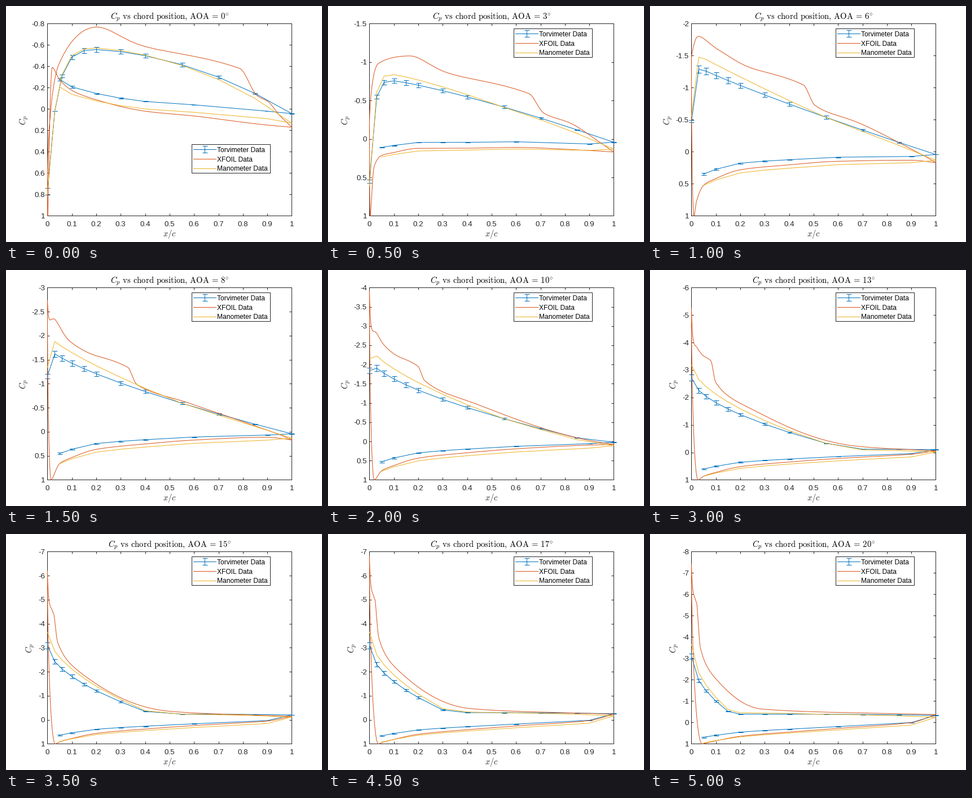
A matplotlib script that plays this animation: 560x420 px, repeating every 5.5 s.

```python
import numpy as np
import matplotlib.pyplot as plt
from matplotlib.animation import FuncAnimation
from matplotlib.patches import Rectangle
from matplotlib.transforms import Affine2D

W, H, DPI = 560, 420, 100
PX = 72 / DPI  # points per pixel
BLUE, ORANGE, YELLOW, INK = "#0072BD", "#D95319", "#EDB120", "#262626"
REL_ERR = 0.041

plt.rcParams.update({
    "font.family": "Liberation Sans",
    "mathtext.fontset": "cm",
    "axes.unicode_minus": False,
})

ANGLES = [0, 3, 6, 8, 10, 11, 13, 15, 16, 17, 20]
LOWEST = [-.8, -1.5, -2, -3, -4, -5, -6, -7, -7, -7, -8]

# Pressure taps along the chord
TAPS_UP = np.array([0, .03, .06, .1, .15, .2, .3, .4, .55, .7, .85, 1])
TAPS_LO = np.array([.05, .1, .2, .3, .4, .6, .9])
TAPS = np.concatenate([TAPS_UP, TAPS_LO[::-1]])
ROOT = np.linspace(0, 1, 700)  # square root of chord position

# Upper-side key values over the angle of attack
KEY_AOA = [0, 3, 8, 11, 15, 17, 20]
TRANSITION = [.82, .68, .342, .139, .027, .0235, .022]
KNEE = [-.42, -.98, -2.35, -3.1, -4.6, -5.17, -5.78]
CREST = [-.768, -1.08, -1.9, -2.82, -4.57, -5.13, -5.74]
BEFORE = [-.38, -.59, -1.345, -2.26, -4.4, -5, -5.6]
AFTER = [-.125, -.335, -.985, -1.87, -3.23, -3.42, -3.5]


def smooth(points, root):
    """Shape-preserving cubic over the square root of x."""
    xs, ys = np.array(points).T
    xs = np.sqrt(xs)
    h = np.diff(xs)
    d = np.diff(ys) / h
    same = d[:-1] * d[1:] > 0
    inner = np.where(same, 2 * d[:-1] * d[1:] / np.where(same, d[:-1] + d[1:], 1), 0)
    m = np.concatenate([d[:1], inner, d[-1:]])
    i = np.clip(np.searchsorted(xs, root, side="right") - 1, 0, len(h) - 1)
    t = (root - xs[i]) / h[i]
    return (ys[i] * (1 + 2 * t) * (1 - t) ** 2 + ys[i + 1] * t * t * (3 - 2 * t)
            + h[i] * (m[i] * t * (1 - t) ** 2 - m[i + 1] * t * t * (1 - t)))


def ease(t):
    t = np.clip(t, 0, 1)
    return t * t * (3 - 2 * t)


def foil_points(aoa):
    """Key points of the upper and lower side, and the nose suction spike."""
    trans, knee, crest, before, after = (
        np.interp(aoa, KEY_AOA, row)
        for row in (TRANSITION, KNEE, CREST, BEFORE, AFTER))
    sep = np.interp(aoa, [8, 11, 15, 20], [.95, .85, .5, .29])
    te = .17 - .045 * max(aoa - 8, 0)
    sep_cp = te - .1 - .22 * (1 - sep)
    nose = knee + max(1.1 - .09 * aoa, -.3)
    spike = -1.35 * ease((aoa - 4.5) / 6.5)

    x_knee = .012 + .035 * np.exp(-aoa / 8)
    x_before, x_after = .96 * trans, 1.03 * trans + .014
    x_crest = x_knee + .21 * (x_before - x_knee)
    upper = [(0, nose), (x_knee, knee), (x_crest, crest),
             (x_crest + .3 * (x_before - x_crest), crest + .43 * (before - crest)),
             (x_before, before), (x_after, after),
             (np.sqrt(x_after * sep), after + (.3 + .011 * aoa) * (sep_cp - after)),
             (sep, sep_cp), (1, te)]

    # The lower side saturates with angle, fastest near the nose
    x_stag = max(.0024 * aoa - .004, .001)
    x = np.array([.02, .05, .1, .2, .4, .6])
    limit = np.array([1.4, 1.05, .95, .79, .64, .43])
    drop = np.array([1.79, 1.325, 1.125, .877, .62, .365])
    cp = limit - drop * np.exp(-aoa / (5 + 30 * x))
    lower = [(0, nose + spike), (x_stag, 1)]
    lower += [p for p in zip(x, cp) if p[0] > 1.1 * x_stag]
    lower += [(.9, .15 - .009 * max(aoa - 4, 0)), (1, te)]
    return upper, lower, spike


def scan_upper(aoa):
    x = TAPS_UP
    peak = np.interp(aoa, [0, 3, 15], [.58, .8, 3.1])
    sep = np.interp(aoa, [9, 11, 15, 20], [1, .85, .43, .165])
    flat = np.interp(aoa, [9, 11, 15, 20], [.05, 0, -.24, -.39])
    rise = np.minimum(np.sqrt(x / sep), 1) ** (1 + 3.5 * np.exp(-aoa / 4))
    nose = 1.35 * np.clip((12 - aoa) / 9, 0, 1)
    return (-peak + (peak + flat * (1 - .15 * x ** 4)) * rise
            + nose * np.exp(-x / (.037 * np.exp(-aoa / 4))))


def solve(aoa):
    """Cp of the scan, the manometer and the computed foil."""
    upper, lower, spike = foil_points(aoa)
    foil_up = smooth(upper, ROOT) + spike * np.exp(-ROOT ** 2 / .004)
    foil = np.concatenate([foil_up[::-1], smooth(lower, ROOT)])

    up = scan_upper(aoa)
    lo = .7 * smooth(lower, np.sqrt(TAPS_LO)) - .085 * np.exp(-aoa / 4)
    gain = .03 + .15 * (1 - np.exp(-aoa / 4))
    man_up = (up * (1 + gain * np.clip(1 - 3 * TAPS_UP ** 2, 0, 1))
              + .09 * TAPS_UP ** 4)
    man_lo = lo + .07 + (.24 - .2 * np.sqrt(TAPS_LO)) * min(aoa / 11, 1)
    return (np.concatenate([up, lo[::-1]]),
            np.concatenate([man_up, man_lo[::-1]]), foil)


fig = plt.figure(figsize=(W / DPI, H / DPI), dpi=DPI, facecolor="white")

L, R, T, B = 73.4, 506.4, 31.4, 373.4
ax = fig.add_axes([L / W, 1 - B / H, (R - L) / W, (B - T) / H])
ax.set_axisbelow(True)
ax.set_xlim(0, 1)
ax.set_xticks(np.arange(11) / 10, [f"{k / 10:g}" for k in range(11)])
ax.tick_params(direction="in", top=True, right=True, length=4.3 * PX, width=PX,
               color=INK, labelcolor=INK, labelsize=13.33 * PX)
ax.tick_params(axis="x", pad=9.4 * PX)
ax.tick_params(axis="y", pad=4.4 * PX)
for spine in ax.spines.values():
    spine.set(color=INK, linewidth=PX, zorder=0.6)

# Pixel-space layer for labels and legend
page = fig.add_axes([0, 0, 1, 1], zorder=5)
page.set(xlim=(0, W), ylim=(H, 0))
page.axis("off")


def line(color, **kw):
    return ax.plot([], [], color=color, lw=PX, clip_on=False, **kw)[0]


CAP = dict(ls="none", marker="_", ms=9 * PX, mew=PX)
scan_line, bars, caps = line(BLUE), line(BLUE), line(BLUE, **CAP)
foil_line, man_line = line(ORANGE), line(YELLOW)

math = dict(size=14.67 * PX, ha="center", va="baseline")
title = page.text(290, 23.3, "", color="black", **math)
page.text(290, 410, "$x/c$", color=INK, **math)
ylabel = page.text(36, 203, "$C_p$", color=INK, rotation=90,
                   rotation_mode="anchor", **math)

shift = Affine2D()
moved = shift + page.transData
page.add_patch(Rectangle((329, 40), 139, 51, fc="white", ec=INK, lw=PX,
                         transform=moved))


def key(x, y, color, **kw):
    page.plot(x, y, color=color, lw=PX, transform=moved, **kw)


rows = [("Torvimeter Data", BLUE), ("XFOIL Data", ORANGE), ("Manometer Data", YELLOW)]
for k, (label, color) in enumerate(rows):
    y = 49.3 + 16.7 * k
    key([332, 372], [y, y], color)
    page.text(374.5, y + 4.6, label, size=12 * PX, color="black", va="baseline",
              transform=moved)
key([352, 352], [43.4, 55.4], BLUE)
key([352, 352], [43.4, 55.4], BLUE, **CAP)


def title_text(aoa):
    gap, thin = r"\hspace{0.4}", r"\hspace{0.2}"
    words = gap.join([r"C_p", r"\mathrm{vs}", r"\mathrm{chord}", r"\mathrm{position}"])
    return rf"${words},{thin}\mathrm{{AOA}}{thin}={thin}{aoa}^{{\circ}}$"


def update(i):
    aoa, low = ANGLES[i], LOWEST[i]
    span = 1 - low
    step = .2 if span < 2 else .5 if span <= 5 else 1
    scan, man, foil = solve(aoa)
    err = REL_ERR * np.abs(scan)
    gap = np.full_like(scan, np.nan)

    ax.set_ylim(1, low)
    ticks = low + step * np.arange(round(span / step) + 1)
    ax.set_yticks(ticks, [f"{round(v, 2) + 0:g}" for v in ticks])

    scan_line.set_data(TAPS, scan)
    bars.set_data(np.repeat(TAPS, 3),
                  np.column_stack([scan - err, scan + err, gap]).ravel())
    caps.set_data(np.tile(TAPS, 2), np.concatenate([scan - err, scan + err]))
    foil_line.set_data(np.concatenate([ROOT[::-1], ROOT]) ** 2, foil)
    man_line.set_data(TAPS, man)

    title.set_text(title_text(aoa))
    ylabel.set_x(36 if step < 1 else 47)
    shift.clear().translate(0, 206 if aoa == 0 else 0)
    return []


anim = FuncAnimation(fig, update, frames=len(ANGLES), interval=500,
                     repeat=True, repeat_delay=0, blit=False)
plt.show()
```
